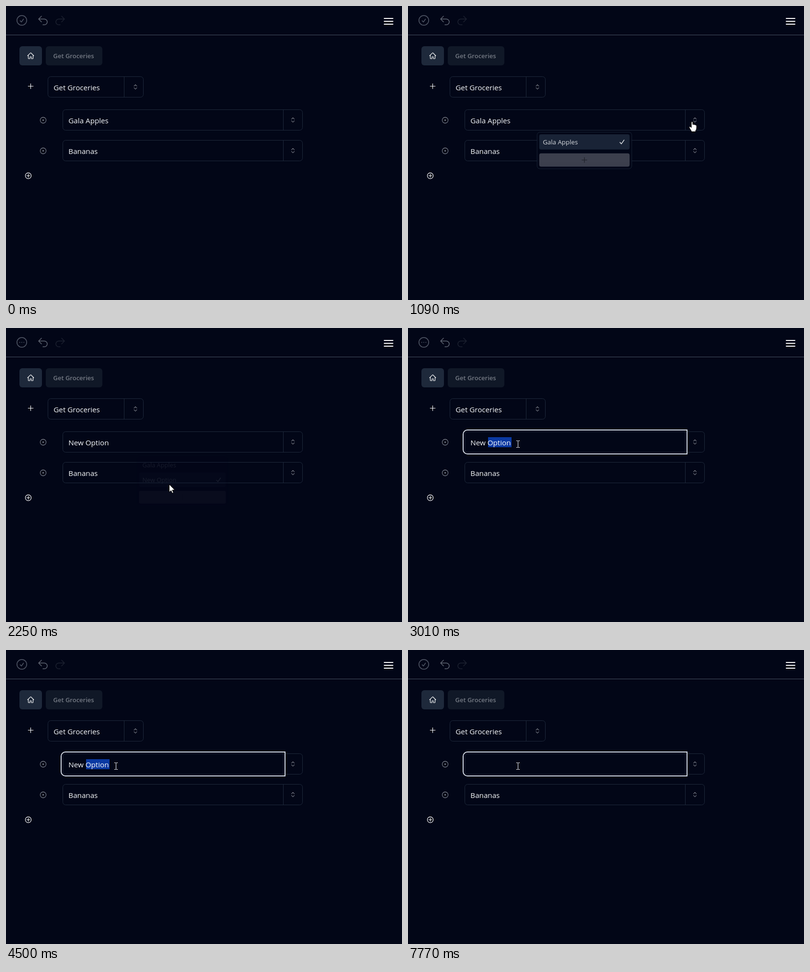
Recreate the animation shown at these times as an HTML page with a canvas. Size 826x614 px, loop 8 s.

```html
<!DOCTYPE html>
<html lang="en">
<head>
<meta charset="utf-8">
<title>Grocery list</title>
<style>
html, body { margin: 0; width: 100%; height: 100%; overflow: hidden; background: #020617; }
canvas { display: block; }
</style>
</head>
<body>
<canvas id="stage" width="826" height="614"></canvas>
<script>
const ctx = document.getElementById('stage').getContext('2d');
const LOOP = 8000, BG = '#020617', LINE = '#1e293b', WHITE = '#f8fafc';
const FONT = '"Open Sans", "Noto Sans", sans-serif';
const FIELD_FONT = '15.2px ' + FONT, MENU_FONT = '13.4px ' + FONT;

const ICON = {
  circle: 'M21 12a9 9 0 1 1-18 0 9 9 0 0 1 18 0Z',
  check: 'M9 12.75 11.25 15 15 9.75',
  undo: 'M9 15 3 9m0 0 6-6M3 9h12a6 6 0 0 1 0 12h-3',
  bars: 'M3 6h18M3 12h18M3 18h18',
  home: 'M2.25 12 11.2 3.05c.44-.44 1.15-.44 1.6 0L21.75 12M4.5 9.75v10.1c0 .62.5 1.15 1.13 1.15H9.75v-4.9c0-.6.5-1.1 1.1-1.1h2.3c.6 0 1.1.5 1.1 1.1V21h4.1c.65 0 1.15-.5 1.15-1.15V9.75',
  plus: 'M4 12h16M12 4v16',
  sort: 'M7.5 9.5 12 5.2l4.5 4.3M7.5 14.5l4.5 4.3 4.5-4.3',
  tick: 'M5.5 13.5 10 18 18.5 6'
};
const ARROW = new Path2D('M.5.5V17L4.3 13.4 6.8 19.2 9.3 18.1 6.9 12.4H12Z');
const HAND = new Path2D('M-2 2Q-2 .5-.5.5T1 2V6.5Q2 5.5 3.5 6.5L4 7Q5.5 6.2 6.5 7.5 8.8 7 9 9.5V14Q9 17 7 19V21.5H-2V20Q-4 17-6 13.5-6.7 11.5-5.5 10.8-4 10.5-2 13Z');
const BEAM = new Path2D('M-4-6.5H-1M0-6.5H3M-4 7.5H-1M0 7.5H3M-.5-6V7');

// Mouse moves: start, steps, then a quadratic curve
const MOVES = [
  [200, 7, 683, 483, 610, 330, 593, 241],
  [1161, 8, 593, 241, 480, 190, 334, 327],
  [1841, 2, 334, 327, 339, 326, 340, 326],
  [2255, 5, 340, 326, 280, 290, 230, 242],
  [3550, 3, 230, 242, 232, 244, 234, 245],
  [4361, 2, 234, 245, 232, 244, 230, 242]
];
const EDITS = [[0, 'Gala Apples'], [2120, 'New Option'], [6030, 'New '], [6180, 'New'], [6380, 'Ne'], [6580, 'N'], [6780, '']];

const during = (t, ...spans) => spans.some(([from, to]) => t >= from && t < to);
const inside = ([x, y], l, t, r, b) => x >= l && x < r && y >= t && y < b;
const easeOut = u => 1 - (1 - Math.min(1, u)) ** 2;

function box(x, y, w, h, r, fill, stroke) {
  ctx.beginPath();
  ctx.roundRect(x, y, w, h, r);
  if (fill) { ctx.fillStyle = fill; ctx.fill(); }
  if (stroke) { ctx.strokeStyle = stroke; ctx.stroke(); }
}

function dot(x, y, r, color) {
  ctx.fillStyle = color;
  ctx.beginPath();
  ctx.arc(x, y, r, 0, 7);
  ctx.fill();
}

function icon(name, cx, cy, scale, color, weight = 1.5, flip = 1) {
  ctx.save();
  ctx.translate(cx, cy);
  ctx.scale(scale * flip, scale);
  ctx.translate(-12, -12);
  ctx.lineCap = ctx.lineJoin = 'round';
  ctx.lineWidth = weight;
  ctx.strokeStyle = color;
  ctx.stroke(new Path2D(ICON[name]));
  ctx.restore();
}

function label(text, x, y, font, color = WHITE) {
  ctx.font = font;
  ctx.fillStyle = color;
  ctx.fillText(text, x, y);
}

function field(x, y, w, h, split, text, textX) {
  ctx.lineWidth = 1;
  box(x + .5, y + .5, w - 1, h - 1, 6, null, LINE);
  ctx.fillStyle = LINE;
  ctx.fillRect(split, y, 1, h);
  icon('sort', split + (w > 300 ? 20.5 : 24), y + 22, .68, '#7d818b');
  label(text, textX, y + 29, FIELD_FONT);
}

function header(t) {
  const gray = '#4b5160';
  ctx.fillStyle = '#475061';
  ctx.fillRect(0, 60, 826, 1);
  icon('circle', 33, 30, 1.13, gray);
  if (during(t, [2120, 3620], [6030, 7640])) [28.7, 33, 37.3].forEach(x => dot(x, 30, .95, gray));
  else icon('check', 33, 30, 1.13, gray);
  icon('undo', 77, 30.3, 1, '#5f6572');
  icon('undo', 113, 30.3, 1, '#1c2130', 1.5, -1);
  icon('bars', 798, 32, 1, '#fff', 2);
}

function page(t, text) {
  box(28, 84, 47, 40, 6, LINE);
  icon('home', 51.5, 104, .667, '#fff', 1.7);
  box(83, 84, 118, 40, 6, '#101827');
  label('Get Groceries', 98.5, 109, '600 13px ' + FONT, '#747a84');
  icon('plus', 51.5, 167.5, .66, '#fff', 1.7);
  field(87, 147, 200, 44, 246, 'Get Groceries', 99.3);

  const selected = during(t, [2950, 3620], [4430, 6030]);
  if (selected) {
    ctx.fillStyle = '#0a39a2';
    ctx.fillRect(167, 228, 49, 21);
  }
  field(118, 216, 501, 44, 578, text, 130.3);
  field(118, 280, 501, 44, 578, 'Bananas', 130.3);
  for (const y of [238.5, 302.5]) {
    icon('circle', 77.5, y, .68, '#868b95');
    dot(77.5, y, 1.4, '#868b95');
  }
  icon('circle', 46.5, 354.5, .68, '#fff', 1.7);
  icon('plus', 46.5, 354.5, .42, '#fff', 2.6);

  if (t >= 2810) {
    ctx.lineWidth = 2;
    box(117, 215, 463, 46, [7, 0, 0, 7], null, BG);
    box(115, 213, 467, 50, [9, 0, 0, 9], null, '#d3d9e3');
  }
  if (during(t, [2810, 2950], [3620, 4150], [4230, 4430], [6030, 7120], [7640, 7770])) {
    ctx.font = FIELD_FONT;
    ctx.fillStyle = '#fff';
    ctx.fillRect(Math.round(130.7 + ctx.measureText(text).width), 228, 1, 21);
  }
}

function menu(t, mouse) {
  if (!during(t, [950, 2310])) return;
  const closing = t >= 2120;
  const frame = Math.floor((t - (closing ? 2120 : 950)) / 65);
  const shown = closing ? 1 - easeOut((frame * 65 + 10) / 200) : easeOut((frame * 68 + 10) / 240);
  const items = closing ? ['Gala Apples', 'New Option'] : ['Gala Apples'];
  const height = 46 + 32 * items.length, last = items.length - 1;
  const hover = !closing && inside(mouse, 273, 309, 463, 337);

  ctx.save();
  ctx.globalAlpha = shown;
  ctx.translate(368, 264 + height / 2 - (closing ? 0 : 8 * (1 - shown)));
  ctx.scale(.95 + .05 * shown, .95 + .05 * shown);
  ctx.translate(-368, -264 - height / 2);
  ctx.lineWidth = 1;
  box(268.5, 264.5, 199, height - 1, 6, BG, LINE);
  items.forEach((item, i) => {
    const y = 269 + 32 * i;
    if (i === last && !hover) box(273, y, 190, 32, 4, LINE);
    label(item, 280.5, y + 21, MENU_FONT);
    if (i === last) icon('tick', 447, y + 16, .66, WHITE, 2.4);
  });
  const y = 264 + height - 33;
  ctx.globalAlpha = shown * (hover ? 1 : .3);
  box(273, y, 190, 28, 4, '#e5e7eb');
  ctx.globalAlpha = shown * (hover ? 1 : .75);
  icon('plus', 368, y + 14, .66, '#0f1118', 2);
  ctx.restore();
}

function mouseAt(t) {
  const move = MOVES.filter(m => m[0] <= t).pop();
  if (!move) return [-99, -99];
  const [start, steps, x0, y0, cx, cy, x1, y1] = move;
  const u = Math.min(1, Math.floor((t - start) / 68.5) / steps), p = u * u * (3 - 2 * u);
  const curve = (a, b, c) => Math.round((1 - p) ** 2 * a + 2 * p * (1 - p) * b + p * p * c);
  return [curve(x0, cx, x1), curve(y0, cy, y1)];
}

function pointer(t, mouse) {
  ctx.save();
  ctx.translate(...mouse);
  ctx.lineWidth = 1;
  const overField = inside(mouse, 118, 216, 578, 260) || inside(mouse, 118, 280, 578, 324);
  if (t > 2255 && overField) {
    ctx.strokeStyle = '#fff';
    ctx.stroke(BEAM);
  } else {
    const shape = t < 1229 && inside(mouse, 578, 216, 619, 260) ? HAND : ARROW;
    ctx.fillStyle = '#fff';
    ctx.strokeStyle = '#000';
    ctx.fill(shape);
    ctx.stroke(shape);
  }
  ctx.restore();
}

function draw(now) {
  const t = now % LOOP, mouse = mouseAt(t);
  const text = EDITS.filter(e => e[0] <= t).pop()[1];
  ctx.fillStyle = BG;
  ctx.fillRect(0, 0, 826, 614);
  header(t);
  page(t, text);
  menu(t, mouse);
  pointer(t, mouse);
  requestAnimationFrame(draw);
}
requestAnimationFrame(draw);
</script>
</body>
</html>
```
